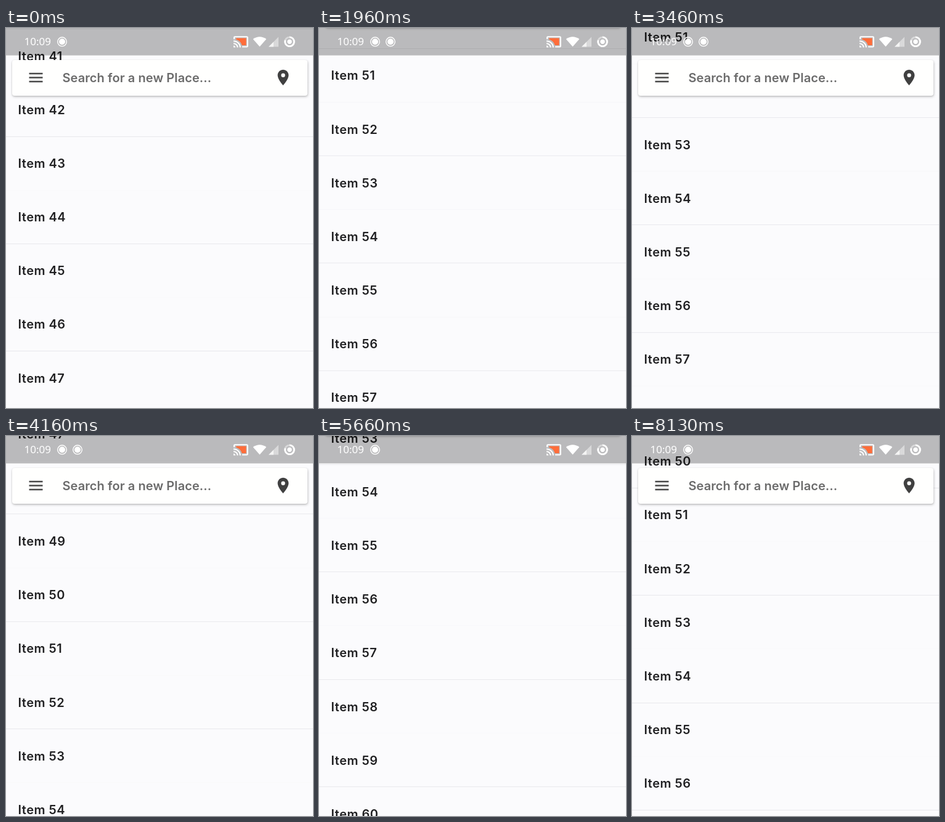
These frames come from a looping animation (498x617 px, 8.6 s). An HTML page:

```html
<!DOCTYPE html>
<html lang="en">
<head>
<meta charset="utf-8">
<title>Floating search bar</title>
<style>
  html, body { margin: 0; width: 100%; height: 100%; overflow: hidden; background: #fbfbfd; }
  #stage { position: relative; width: 498px; height: 617px; overflow: hidden; background: #fbfbfd; }
  #stage > * { position: absolute; left: 0; top: 0; }
  .item, .hint { font: 600 20px/28px Inter, "Open Sans", sans-serif; white-space: pre; }
  .item { position: absolute; left: 19.5px; color: #202022; letter-spacing: .48px; }
  .rule { position: absolute; width: 498px; height: 1px; background: #e8e8ec; }
  #bar { width: 498px; height: 120px; }
  .card {
    position: absolute; left: 9.5px; top: 52px; width: 479px; height: 58px;
    border-radius: 4px; background: #fffffe;
    box-shadow: 0 1px 3px rgba(0, 0, 0, .18), 1px 2px 4px rgba(0, 0, 0, .14);
  }
  .hint { position: absolute; left: 91.5px; top: 67px; color: #6b6b6b; letter-spacing: .08px; }
  #bar svg { position: absolute; left: 0; top: 0; }
  .clock { font: 17px "Noto Sans", "Open Sans", sans-serif; }
</style>
</head>
<body>
<div id="stage">
  <div id="list"></div>
  <div id="rules"></div>
  <div id="bar">
    <div class="card"></div>
    <div class="hint">Search for a new Place...</div>
    <svg width="498" height="120">
      <path d="M37.5 74h22M37.5 80.5h22M37.5 87h22" stroke="#484848" stroke-width="2.3"/>
      <path transform="translate(434.3 65.3) scale(1.27)" fill="#404040" fill-rule="evenodd"
        d="M12 2C8.13 2 5 5.13 5 9c0 5.25 7 13 7 13s7-7.75 7-13c0-3.87-3.13-7-7-7zm0 9.5a2.5 2.5 0 1 1 0-5 2.5 2.5 0 0 1 0 5z"/>
    </svg>
  </div>
  <svg width="498" height="46" fill="#fff">
    <defs>
      <g id="dot">
        <circle r="7.3" fill="none" stroke="#fff" stroke-width="1.4"/>
        <circle r="5"/>
      </g>
    </defs>
    <rect width="498" height="44.5" fill="#000" opacity=".26"/>
    <text class="clock" x="29.5" y="28">10:09</text>
    <use href="#dot" x="91" y="22.3"/>
    <use id="second" href="#dot" x="116" y="22.3"/>
    <!-- cast -->
    <g transform="translate(368 10.2) scale(1.08 1.01)">
      <path fill="#ff6d3a" d="M5 6.3H20V17.7H13.6C12.4 13 9.5 9.6 5 8.5z"/>
      <path d="M1 18v3h3c0-1.66-1.34-3-3-3zm0-4v2c2.76 0 5 2.24 5 5h2c0-3.87-3.13-7-7-7zm0-4v2c4.97 0 9 4.03 9 9h2c0-6.08-4.93-11-11-11zm20-7H3c-1.1 0-2 .9-2 2v3h2V5h18v14h-7v2h7c1.1 0 2-.9 2-2V5c0-1.1-.9-2-2-2z"/>
    </g>
    <!-- wifi, signal, battery -->
    <path d="M411.5 30.3L400.7 18Q411.5 10.5 422.3 18z"/>
    <path d="M426 30.5h16v-16z" opacity=".45"/>
    <path d="M426 30.5h8v-8z" opacity=".7"/>
    <g transform="translate(460 22.3)">
      <g fill="none" stroke="#fff" stroke-width="2.8">
        <circle r="7.4" opacity=".45"/>
        <path d="M0 -7.4A7.4 7.4 0 1 1 -7 -2.4"/>
      </g>
      <circle r="3.7"/>
    </g>
  </svg>
</div>
<script>
const LOOP = 8600, PITCH = 87.17, FIRST = 40, LAST = 63, HIDE = 111;
const PEAK = 1239.3, LOW = 526.2, REST = 1268.4;

// Each swipe: drag start, release, stop; scroll at each; power of the fling's decay.
const SWIPES = [
  { t: [1130, 1450, 2860], s: [0, 63.7, PEAK], k: 2.4 },
  { t: [2900, 3150, 4660], s: [PEAK, 1180, LOW], k: 2.4 },
  { t: [5230, 5380, 6060], s: [LOW, 586, REST], k: 2.5 },
  { t: [7030, 7200, 7860], s: [REST, 1220, 789], k: 2.4 }
];

const $ = id => document.getElementById(id);
const clamp = (v, lo, hi) => Math.min(hi, Math.max(lo, v));
const part = (t, a, b) => clamp((t - a) / (b - a), 0, 1);

function scrollIn({ t: [t0, t1, t2], s: [s0, s1, s2], k }, t) {
  return t < t1
    ? s0 + (s1 - s0) * part(t, t0, t1) ** 3
    : s1 + (s2 - s1) * (1 - (1 - part(t, t1, t2)) ** k);
}

// The bar leaves with downward scrolling and returns as soon as it reverses.
function pose(t) {
  const swipe = SWIPES.filter(w => t >= w.t[0]).pop() || SWIPES[0];
  const scroll = scrollIn(swipe, t);
  const moved = scroll - swipe.s[0];
  const down = swipe.s[2] > swipe.s[0];
  return { scroll, hidden: clamp(down ? moved : HIDE + moved, 0, HIDE) };
}

function add(parent, className) {
  const el = document.createElement("div");
  el.className = className;
  $(parent).append(el);
  return el;
}

const rules = [];
for (let n = FIRST; n <= LAST; n++) {
  const item = add("list", "item");
  item.textContent = "Item " + n;
  item.style.top = 118.8 + (n - 42) * PITCH + "px";
  rules.push(add("rules", "rule"));
}

function draw(t) {
  const { scroll, hidden } = pose(t);
  $("list").style.transform = `translateY(${-scroll}px)`;
  $("bar").style.transform = `translateY(${-hidden}px)`;
  // Hairlines sit on whole pixels and fade with their subpixel phase.
  rules.forEach((rule, i) => {
    const n = FIRST + i;
    const y = Math.floor(176 + (n - 42) * PITCH - scroll);
    rule.style.transform = `translateY(${y}px)`;
    rule.style.opacity = .55 + .42 * Math.cos(Math.PI * (n + 2 * scroll));
  });
  $("second").style.opacity = part(t, 1230, 1390) - part(t, 4930, 5060);
}

const start = performance.now();
function tick() {
  draw((performance.now() - start) % LOOP);
  requestAnimationFrame(tick);
}
tick();
</script>
</body>
</html>
```
